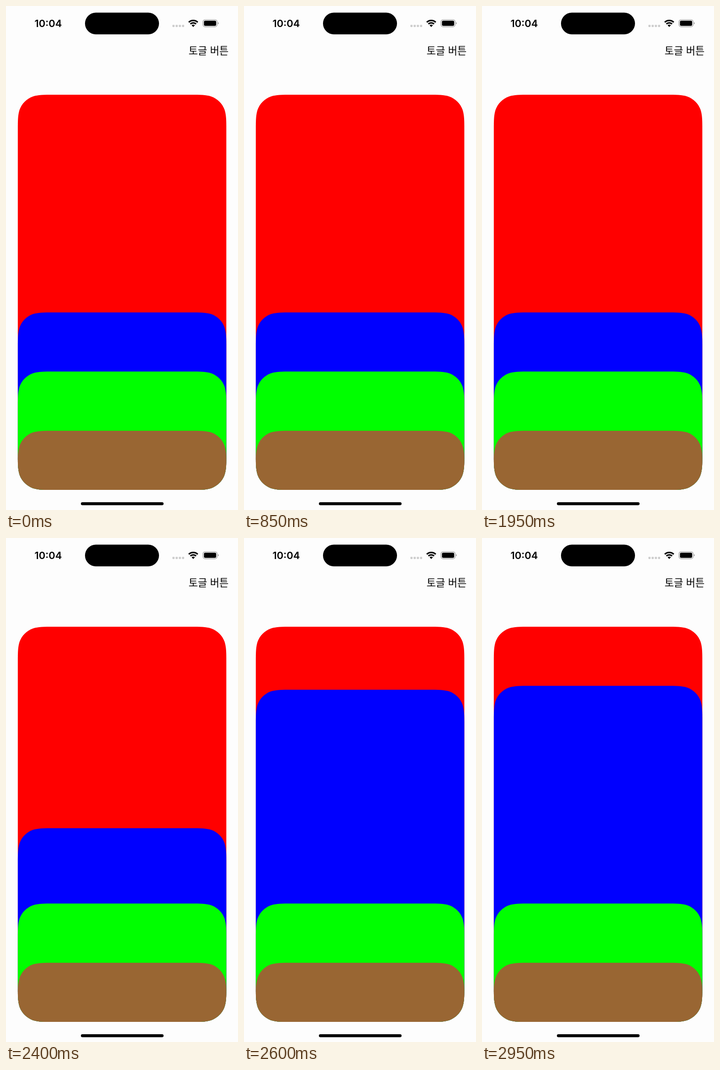
These frames come from a looping animation (508 by 1102 pixels, 3 s). An HTML page:

```html
<!DOCTYPE html>
<html lang="ko">
<head>
<meta charset="utf-8">
<title>Card stack</title>
<style>
  html, body { margin: 0; width: 100%; height: 100%; overflow: hidden; background: #fdfdfd; }
  svg { display: block; width: 100%; height: 100%; }
  .time { font: 600 22px Inter, sans-serif; }
  .button { font: 400 22.2px "Noto Sans CJK KR", "Noto Sans CJK", sans-serif; }
</style>
</head>
<body>
<svg viewBox="0 0 508 1102">
  <rect width="508" height="1102" fill="#fdfdfd"/>
  <text class="time" x="92.5" y="46" text-anchor="middle">10:04</text>
  <rect x="173" y="14.5" width="162" height="47.5" rx="23.75"/>
  <g id="dots" fill="#ccc"></g>
  <g id="wifi" fill="none" stroke="#000"></g>
  <rect x="431.2" y="29.8" width="31.2" height="15.8" rx="5" fill="none" stroke="#a0a0a0" stroke-width="1.3"/>
  <rect x="433.4" y="32" width="26.8" height="11.4" rx="3"/>
  <path d="M464 35.3Q466 36 466 37.7T464 40.1Z" fill="#a0a0a0"/>
  <text class="button" x="443.6" y="106.3" text-anchor="middle">토글 버튼</text>
  <g id="cards"></g>
  <rect x="164" y="1085" width="181" height="6.5" rx="3.25"/>
</svg>
<script>
const LOOP = 3000, STEP = 50;
const MOVE = { start: 2333, length: 300 };
const PT = 1.2934;               // pixels per layout point
const LEFT = 20 * PT, RIGHT = 373 * PT, BOTTOM = 818 * PT;
const RADIUS = 40 * PT;
const CLOSED = 518, OPEN = 250;  // top of the blue card, in points

const $ = id => document.getElementById(id);

function add(parent, tag, attrs) {
  const el = document.createElementNS('http://www.w3.org/2000/svg', tag);
  for (const key in attrs) el.setAttribute(key, attrs[key]);
  return parent.appendChild(el);
}

// Continuous corner: from the horizontal edge to the vertical edge, in radii.
const CORNER = [
  [1.5287, 0], [1.0885, 0], [0.8684, 0], [0.6315, 0.0749],
  [0.3728, 0.1691], [0.1691, 0.3728], [0.0749, 0.6315],
  [0, 0.8684], [0, 1.0885], [0, 1.5287]
];

function cardPath(top) {
  const limit = (BOTTOM - top) / 2;
  const corner = (x, y, sx, sy, reverse) => {
    const pts = CORNER.map(([a, b]) => [
      (x + sx * a * RADIUS).toFixed(2),
      (y + sy * Math.min(b * RADIUS, limit)).toFixed(2)
    ]);
    if (reverse) pts.reverse();
    return pts[0] + 'C' + pts.slice(1).join(' ');
  };
  return 'M' + corner(LEFT, top, 1, 1, true) +
    'L' + corner(RIGHT, top, -1, 1, false) +
    'L' + corner(RIGHT, BOTTOM, -1, -1, true) +
    'L' + corner(LEFT, BOTTOM, 1, -1, false) + 'Z';
}

// cubic-bezier(.42, 0, .58, 1)
function easeInOut(x) {
  if (x <= 0) return 0;
  if (x >= 1) return 1;
  let lo = 0, hi = 1;
  for (let i = 0; i < 24; i++) {
    const s = (lo + hi) / 2, u = 1 - s;
    if (1.26 * s * u * u + 1.74 * s * s * u + s * s * s < x) lo = s;
    else hi = s;
  }
  return lo * lo * (3 - 2 * lo);
}

function buildStatus() {
  for (let i = 0; i < 4; i++) {
    add($('dots'), 'rect', { x: 364.4 + i * 7, y: 41.2, width: 4.7, height: 4.7, rx: 1.4 });
  }
  const fan = (r, close) => {
    const dx = r * Math.sin(0.75), y = 46 - r * Math.cos(0.75);
    return `M${410 - dx} ${y}A${r} ${r} 0 0 1 ${410 + dx} ${y}` + (close ? 'L410 46Z' : '');
  };
  add($('wifi'), 'path', { d: fan(14.4), 'stroke-width': 3.3 });
  add($('wifi'), 'path', { d: fan(9.2), 'stroke-width': 3.2 });
  add($('wifi'), 'path', { d: fan(5.3, true), fill: '#000', stroke: 'none' });
}

const [, blue] = [['#f00', 150], ['#00f', CLOSED], ['#0f0', 618], ['#963', 718]]
  .map(([fill, top]) => add($('cards'), 'path', { fill, d: cardPath(top * PT) }));

function draw(time) {
  const t = Math.floor((time % LOOP) / STEP) * STEP;
  const p = easeInOut((t - MOVE.start) / MOVE.length);
  blue.setAttribute('d', cardPath((CLOSED + (OPEN - CLOSED) * p) * PT));
}

buildStatus();
const began = performance.now();
function tick() {
  draw(performance.now() - began);
  requestAnimationFrame(tick);
}
tick();
</script>
</body>
</html>
```
